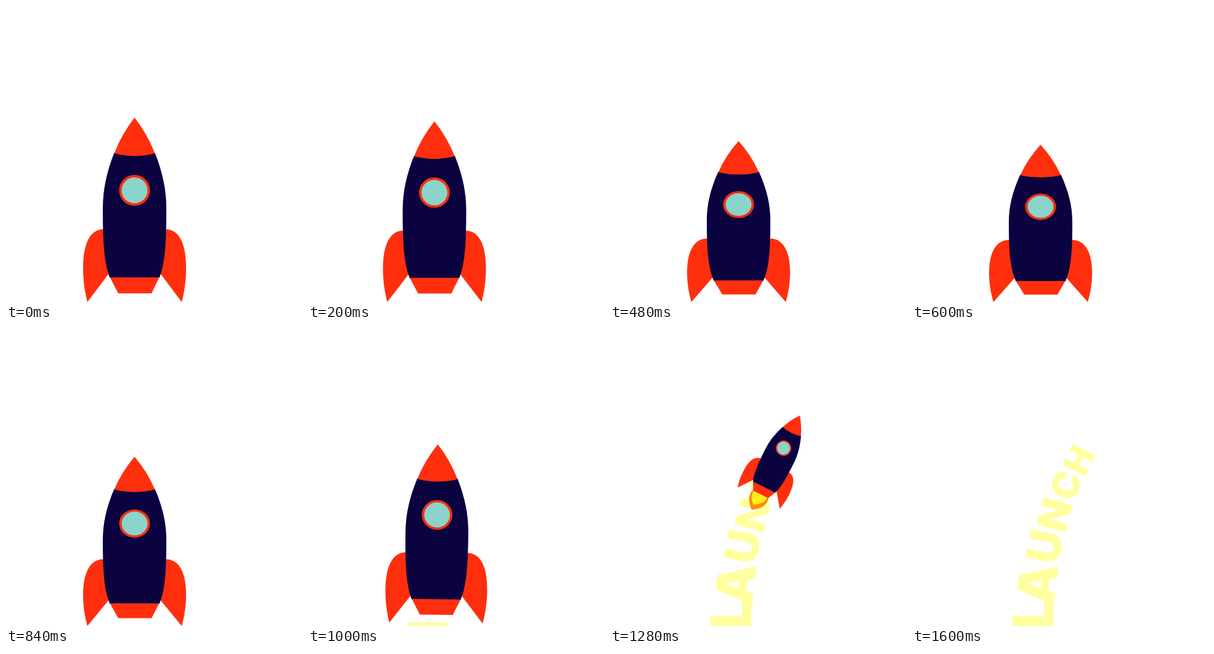
These frames come from a looping animation (480 px wide and 480 px high, 2880 ms). An HTML page with a canvas:

```html
<!DOCTYPE html>
<html lang="en">
<head>
<meta charset="utf-8">
<title>Launch</title>
<style>
  html, body { margin: 0; width: 100%; height: 100%; overflow: hidden; background: #fff; }
  canvas { display: block; }
</style>
</head>
<body>
<canvas id="stage" width="480" height="480"></canvas>
<script>
const ctx = document.getElementById('stage').getContext('2d');
const LOOP = 2880, STEP = 40, LIFTOFF = 960, GONE = 1600;
const CX = 208.5, CY = 330, GROUND = 480;
const RED = '#ff2f0e', NAVY = '#0a0340', TEAL = '#8ad4cc';
const ORANGE = '#ff8a00', YELLOW = '#ffee1a', PALE = '#ffff9f';

const shapes = {
  fin: new Path2D('M158 362C135 362 125 388 125 425C125 445 128 465 132 480L169 431Z'),
  body: new Path2D('M175.5 238C163 270 157 298 157 328C157 375 158 415 168.5 441H248.5C259 415 260 375 260 328C260 298 254 270 241.5 238Z'),
  nose: new Path2D('M208.5 181Q229 207 241.5 239Q208.5 247.5 175.5 239Q188 207 208.5 181Z'),
  nozzle: new Path2D('M168.5 440H248.5L236 466H182Z'),
  flame: new Path2D('M181 462C172 487 183 503 205 524C232 507 245 487 236 462Z'),
  core: new Path2D('M186 462C180 482 188 494 203 507C223 495 236 481 232 462Z')
};

// letter, centre x, centre y, tilt in degrees, font size
const letters = [
  ['L', 196, 459, 0, 91],
  ['A', 203, 412, 6, 85],
  ['U', 215, 351.5, 11, 74],
  ['N', 231, 299.5, 15.5, 67],
  ['C', 249, 251.5, 21, 60],
  ['H', 271, 211, 26, 57]
];

const rad = deg => deg * Math.PI / 180;
const smooth = u => {
  u = Math.min(1, Math.max(0, u));
  return u * u * (3 - 2 * u);
};
const mix = (slope, p) => slope * p + (1 - slope) * smooth(p);

function fill(shape, color) {
  ctx.fillStyle = color;
  ctx.fill(shape);
}

function poseRocket(p) {
  ctx.translate(CX + 132 * mix(0.34, p), CY - 249 * mix(1.09, p));
  ctx.rotate(rad(53 * p));
  ctx.scale(1 - p, 1 - p);
  ctx.translate(-CX, -CY);
}

function drawWord() {
  ctx.fillStyle = PALE;
  for (const [char, x, y, tilt, size] of letters) {
    ctx.save();
    ctx.translate(x, y);
    ctx.rotate(rad(tilt - 90));
    ctx.font = `900 ${size}px Inter, sans-serif`;
    const m = ctx.measureText(char);
    ctx.fillText(char,
      (m.actualBoundingBoxLeft - m.actualBoundingBoxRight) / 2,
      (m.actualBoundingBoxAscent - m.actualBoundingBoxDescent) / 2);
    ctx.restore();
  }
}

// The word only shows behind the rocket's tail.
function drawTrail(p) {
  ctx.save();
  if (p < 1) {
    ctx.save();
    poseRocket(p);
    ctx.beginPath();
    ctx.rect(-1e5, GROUND - 100 * p, 2e5, 1e5);
    ctx.restore();
    ctx.clip();
  }
  drawWord();
  ctx.restore();
}

function drawRocket(t, p) {
  const squash = 1 - 0.147 * smooth(1 - Math.abs(t - 600) / 520);
  const shake = t < LIFTOFF ? 4 * Math.sin(2 * Math.PI * t / 120) : 0;
  const thrust = smooth((t - 1070) / 210);
  ctx.save();
  poseRocket(p);
  ctx.translate(shake, GROUND);
  ctx.scale(1, squash);
  ctx.translate(0, -GROUND);

  ctx.save();
  ctx.translate(0, 58 * (thrust - 1));
  fill(shapes.flame, ORANGE);
  fill(shapes.core, YELLOW);
  ctx.restore();

  fill(shapes.fin, RED);
  ctx.save();
  ctx.translate(2 * CX, 0);
  ctx.scale(-1, 1);
  fill(shapes.fin, RED);
  ctx.restore();

  fill(shapes.body, NAVY);
  fill(shapes.nose, RED);
  fill(shapes.nozzle, RED);

  ctx.beginPath();
  ctx.arc(CX, 299, 23, 0, 2 * Math.PI);
  ctx.fillStyle = TEAL;
  ctx.fill();
  ctx.strokeStyle = RED;
  ctx.lineWidth = 4;
  ctx.stroke();
  ctx.restore();
}

function draw(t) {
  const p = smooth((t - LIFTOFF) / (GONE - LIFTOFF));
  ctx.fillStyle = '#fff';
  ctx.fillRect(0, 0, 480, 480);
  if (t > LIFTOFF) drawTrail(p);
  if (t < GONE) drawRocket(t, p);
}

const start = performance.now();
function tick() {
  const t = (performance.now() - start) % LOOP;
  draw(Math.floor(t / STEP) * STEP);
  requestAnimationFrame(tick);
}
tick();
</script>
</body>
</html>
```
